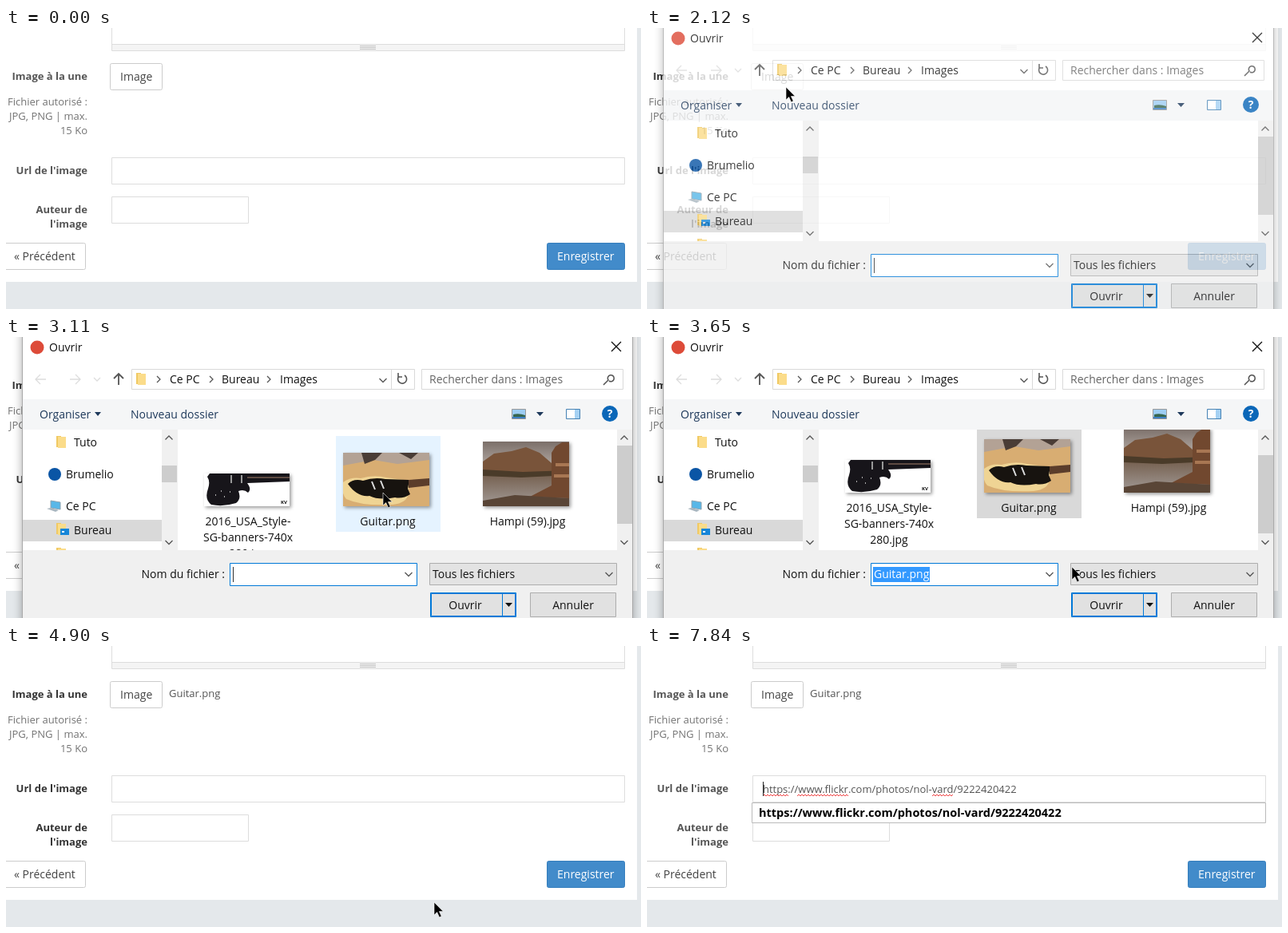
Write an HTML page that moves like this. It is 795 px wide and 352 px high and loops after 8 s.

```html
<!DOCTYPE html>
<html lang="fr">
<head>
<meta charset="utf-8">
<style>
html, body { margin: 0; width: 100%; height: 100%; overflow: hidden; }
svg { display: block; width: 795px; height: 352px; font: 14px "Open Sans", sans-serif; }
.label { font: bold 13px "Open Sans", sans-serif; text-anchor: end; }
.help { font-size: 13px; fill: #737373; text-anchor: end; }
.small { font-size: 13px; fill: #555; }
.field { fill: #fff; stroke: #ddd; }
.btn { fill: #fff; stroke: #ccc; }
.btn.hover { fill: #ebebeb; stroke: #adadad; }
.dark { fill: #444; }
.line { fill: none; stroke: #555; stroke-width: 1.3; }
.box { fill: #fff; stroke: #d9d9d9; }
.mid { text-anchor: middle; }
.navy { fill: #1e395b; }
#dialog { fill: #111; }
#frame { filter: drop-shadow(0 2px 6px #0005); }
.thumb { filter: drop-shadow(2px 2px 2px #0006); }
</style>
</head>
<body>
<svg viewBox="0 0 795 352">
  <defs>
    <path id="right" class="line" d="M-2-4l4 4-4 4"/>
    <path id="down" class="line" d="M-4.500-2l4.500 4.500 4.500-4.500"/>
    <path id="up" class="line" d="M-4.500 2.500l4.500-4.500 4.500 4.500"/>
    <g id="folder"><path d="M0 0h6v14H0z" fill="#f0c963"/><path d="M2 1h10v14H2z" fill="#fbdc8a"/></g>
    <clipPath id="navClip"><path d="M20 116h175v151H20z"/></clipPath>
    <clipPath id="listClip"><path d="M216 116h549v151H216z"/></clipPath>
    <clipPath id="bodyClip"><path d="M422 145h108v67H422z"/></clipPath>
    <linearGradient id="sky" x2="0" y2="1">
      <stop stop-color="#7b6f69"/><stop offset=".4" stop-color="#b5aca6"/>
    </linearGradient>
    <linearGradient id="water" x2="0" y2="1">
      <stop stop-color="#75604f"/><stop offset="1" stop-color="#a39c98"/>
    </linearGradient>
  </defs>

  <!-- form page -->
  <path d="M0 0h795v352H0z" fill="#e4e8eb"/>
  <path d="M0 0h790v318H0z" fill="#fff"/>
  <path class="field" d="M132.500-2v30.500h642V-2"/>
  <path d="M133 21h641v7H133z" fill="#f4f4f4"/>
  <path d="M133 20.500h641" stroke="#ddd"/>
  <path d="M443 22.500h20m-20 2h20m-20 2h20" stroke="#c4c4c4"/>
  <g id="labels">
    <text class="label" x="102" y="65">Image à la une</text>
    <text class="label" x="102" y="183">Url de l'image</text>
    <text class="label" x="102" y="232">Auteur de</text>
    <text class="label" x="102" y="250">l'image</text>
  </g>
  <text class="help" x="102" y="97">Fichier autorisé :</text>
  <text class="help" x="102" y="115">JPG, PNG | max.</text>
  <text class="help" x="102" y="133">15 Ko</text>
  <rect id="imageBtn" class="btn" x="130.500" y="44.500" width="65" height="33" rx="2"/>
  <text class="dark" x="143" y="66">Image</text>
  <text id="chosen" class="small" x="204" y="64">Guitar.png</text>
  <path class="field" d="M132.500 162.500h642v33h-642z"/>
  <path class="field" d="M132.500 211.500h171v33h-171z"/>
  <rect class="btn" x="-5.500" y="269.500" width="105" height="33" rx="2"/>
  <text class="dark" x="10" y="291">« Précédent</text>
  <rect x="677.500" y="269.500" width="97" height="33" rx="2" fill="#428bca" stroke="#357ebd"/>
  <text x="690" y="291" fill="#fff">Enregistrer</text>
  <text id="url" class="small" x="145" y="184">https://www.flickr.com/photos/nol-vard/9222420422</text>
  <path id="squiggles" fill="none" stroke="#e33" stroke-width=".9"/>
  <path id="caret" d="M145.500 170v18" stroke="#222"/>
  <g id="suggest">
    <path d="M131.500 196.500h643v25h-643z" fill="#fff" stroke="#bbb"/>
    <text x="140" y="214" font-size="14.500" font-weight="bold">https://www.flickr.com/photos/nol-vard/9222420422</text>
  </g>

  <!-- file dialog -->
  <g id="dialog">
    <path id="frame" d="M20-20h765v400H20z" fill="#fff"/>
    <circle id="appIcon" cx="39" cy="13" r="8.500" fill="#dd4b39"/>
    <text id="title" y="18">Ouvrir</text>
    <path class="line" d="M758 6l12 12m0-12l-12 12" style="stroke:#111"/>
    <path class="line" d="M50 53H37m6-6l-6 6 6 6M80 53h13m-6-6l6 6-6 6m23-8l4 4 4-4" style="stroke:#ddd"/>
    <path class="line" d="M141 60V46m-6 6l6-6 6 6" style="stroke-width:1.800"/>
    <path class="box" d="M157.500 40.500h354v25h-354zM482.500 40.500v25"/>
    <use href="#folder" x="163" y="45"/>
    <use href="#right" x="191" y="53"/><text x="205" y="58">Ce PC</text>
    <use href="#right" x="257" y="53"/><text x="270" y="58">Bureau</text>
    <use href="#right" x="329" y="53"/><text x="343" y="58">Images</text>
    <use href="#down" x="472" y="54"/>
    <path class="line" d="M492 49a5.500 5.500 0 1 0 7-1m-8-3v5h5" style="stroke-width:1.600"/>
    <path class="box" d="M520.500 40.500h252v25h-252z"/>
    <text x="530" y="58" fill="#666">Rechercher dans : Images</text>
    <path class="line" d="M748 60l6-6a4 4 0 1 1 1 1" style="stroke-width:1.600"/>

    <path d="M21 78h763v38H21z" fill="#f5f6f7"/>
    <text class="navy" x="42" y="102">Organiser</text>
    <path class="navy" d="M111 94h8l-4 5zM664 94h9l-4.500 5z"/>
    <text class="navy" x="156" y="102">Nouveau dossier</text>
    <path d="M633.500 90.500h17v12h-17z" fill="#9dcdf3" stroke="#999"/>
    <path d="M635 97q7-2 15 1v4h-15z" fill="#37664e"/>
    <path d="M634 100h16v2h-16z" fill="#3d80c4"/>
    <path d="M701.500 90.500h17v12h-17z" fill="#fff" stroke="#4582b4"/>
    <path d="M712 91h6v11h-6z" fill="#a5d1f3"/>
    <circle cx="756" cy="96" r="10" fill="#0b67b8"/>
    <text class="mid" x="756" y="101" font-weight="bold" style="fill:#fff">?</text>

    <g clip-path="url(#navClip)">
      <path d="M21 229h174v27H21z" fill="#d9d9d9"/>
      <use href="#folder" x="63" y="124"/><text x="85" y="137">Tuto</text>
      <circle cx="61" cy="172" r="8" fill="#0a55a5"/><text x="75" y="177">Brumelio</text>
      <path d="M56 205l12 2v9l-12-2z" fill="#58b7e8" stroke="#8fa3b0"/><path d="M51 215l5-1 10 3-4 2z" fill="#aab7c0"/>
      <text x="75" y="217">Ce PC</text>
      <use href="#folder" x="63" y="233"/><path d="M68 240h11v8H68z" fill="#1686d9"/><path d="M70 243h3v2h-3z" fill="#fff"/>
      <text x="85" y="247">Bureau</text>
      <use href="#folder" x="63" y="264"/><text x="85" y="277">Eaux</text>
    </g>
    <path d="M195 116h20v151h-20zM765 116h19v151h-19z" fill="#f0f0f0"/>
    <path d="M195 161h19v21h-19z" fill="#cdcdcd"/>
    <path id="thumbBar" d="M765 136h19v98h-19z" fill="#cdcdcd"/>
    <use href="#up" x="204" y="126"/><use href="#down" x="204" y="257"/>
    <use href="#up" x="774" y="126"/><use href="#down" x="774" y="257"/>

    <g clip-path="url(#listClip)"><g id="files">
      <path id="highlight" d="M413 124h131v120H413z"/>
      <g class="thumb">
        <path d="M248 171h107v41H248z" fill="#fff"/>
        <path d="M255 171h100v10l-53 2q6 8 1 12-5-5-12-2 4 10-3 15-16 5-31 2-9-7-4-20 3-9-1-15z" fill="#17151a"/>
        <path d="M302 176h53" stroke="#5d4a42" stroke-width="2"/>
        <path d="M282 173v10m13-10v10" stroke="#999" stroke-width="2"/>
        <path d="M262 198h1m6-5h1m3 7h1m6-6h1" stroke="#aaa" stroke-width="2"/>
        <text x="344" y="209" font-size="6" font-weight="bold">KV</text>
      </g>
      <g class="thumb"><g clip-path="url(#bodyClip)">
        <path d="M422 145h108v67H422z" fill="#d8ad72"/>
        <path d="M422 145h108v9l-40 5-30-5-38 7z" fill="#b3a295"/>
        <path d="M445 145h26l-9 9-13 5zM492 145h24l-9 8z" fill="#4a3d36"/>
        <path d="M422 182q10-7 22-5 17-5 32-1l28 4v16q-2 12-20 14-38 2-58-7-7-8-4-21z" fill="#efd494"/>
        <path d="M428 184q7-7 19-4 14-5 28-2l30 1-2 11 3 7q-9 6-19 4-20 4-32-2-15 2-27-15z" fill="#17130f"/>
        <path d="M504 179l26-2v9l-26 3z" fill="#5b3d2b"/>
        <path d="M458 181l4 10m7-11l4 10" stroke="#ddd" stroke-width="2"/>
      </g></g>
      <g class="thumb">
        <path d="M597 131h108v81H597z" fill="url(#sky)"/>
        <path d="M597 172h108v40H597z" fill="url(#water)"/>
        <path d="M597 156l14-10 22-3 18-5 17 7 15 13 22 3v12H597z" fill="#79543a"/>
        <path d="M597 166l50 3 58-2v6l-60 3-48-2z" fill="#4a3b29"/>
        <path d="M683 145l5-8 8-5h9v70l-49-2 27-14z" fill="#71482f"/>
        <path d="M597 205l40-7 68 4v10H597z" fill="#594536"/>
        <path d="M688 158h17v4h-17zM686 172h19v4h-19z" fill="#a87753"/>
      </g>
      <g class="mid">
        <text x="303" y="236">2016_USA_Style-</text>
        <text x="303" y="256">SG-banners-740x</text>
        <text x="303" y="276">280.jpg</text>
        <text x="478" y="236">Guitar.png</text>
        <text x="653" y="236">Hampi (59).jpg</text>
      </g>
    </g></g>

    <path d="M21 267h763v85H21z" fill="#f0f0f0"/>
    <path id="edge" d="M20.500 0v352M784.500 0v352"/>
    <text x="274" y="302" text-anchor="end">Nom du fichier :</text>
    <path id="nameBox" d="M280.500 283.500h234v28h-234z" fill="#fff"/>
    <path id="nameCaret" d="M284.500 288v19" stroke="#333"/>
    <g id="nameText">
      <path d="M283 288h71v19h-71z" fill="#3399ff"/>
      <text x="284" y="302" style="fill:#fff">Guitar.png</text>
    </g>
    <use href="#down" x="504" y="297"/>
    <path d="M530.500 283.500h234v27h-234z" fill="#e3e3e3" stroke="#adadad"/>
    <text x="534" y="302">Tous les fichiers</text>
    <use href="#down" x="755" y="297"/>
    <path id="openBtn" d="M531.500 320.500h107v30h-107z" stroke="#0078d7"/>
    <path id="openFocus" d="M532.500 321.500h105v28h-105z" fill="none" stroke="#0078d7"/>
    <path d="M621.500 321v29" stroke="#0078d7"/>
    <path d="M625 333h9l-4.500 5z"/>
    <text class="mid" x="575" y="341">Ouvrir</text>
    <path d="M656.500 320.500h107v30h-107z" fill="#e1e1e1" stroke="#adadad"/>
    <text class="mid" x="710" y="341">Annuler</text>
  </g>

  <g id="cursor">
    <path id="arrow" d="M0 0v16l3.700-3.500 2.800 6.300 2.700-1.200-2.800-6h5z" stroke="#fff" stroke-width=".6"/>
    <path id="beam" d="M-3.500-7.500h2.500l1 1 1-1h2.500M0-7v14M-3.500 7.500h2.500l1-1 1 1h2.500" fill="none" stroke="#111" stroke-width="1.200"/>
  </g>
</svg>
<script>
const LOOP = 8000;
const $ = id => document.getElementById(id);
const show = (id, on) => $(id).style.display = on ? '' : 'none';
const clamp = v => Math.min(1, Math.max(0, v));

// time, x, y of the pointer
const route = [
  [1020, 526, 324], [1100, 457, 289], [1170, 402, 259], [1330, 295, 183],
  [1490, 190, 84], [1560, 190, 84], [1570, 176, 76], [1640, 169, 73], [1880, 169, 73],
  [1890, 174, 74], [2500, 174, 74], [2800, 335, 150], [3110, 472, 195], [3330, 472, 195],
  [3600, 525, 275], [3880, 566, 344], [4200, 566, 344], [4280, 565, 342], [4700, 565, 342],
  [4980, 525, 313], [5140, 460, 275], [5290, 418, 235], [5440, 405, 206],
  [5590, 405, 205], [5670, 407, 198], [5810, 407, 198], [5820, 406, 197], [LOOP, 406, 197]
];

function pointer(t) {
  const i = Math.max(1, route.findIndex(p => p[0] > t));
  const [t0, x0, y0] = route[i - 1], [t1, x1, y1] = route[i];
  const k = clamp((t - t0) / (t1 - t0));
  return [Math.round(x0 + (x1 - x0) * k), Math.round(y0 + (y1 - y0) * k)];
}

function zigzag(x0, x1) {
  let d = `M${x0} 188`;
  for (let x = x0 + 2, up = true; x <= x1; x += 2, up = !up) d += `L${x} ${up ? 186 : 188}`;
  return d;
}
$('squiggles').setAttribute('d', zigzag(145, 177) + zigzag(188, 252) + zigzag(357, 384));

function draw(t) {
  const [x, y] = pointer(t);
  const open = t >= 2040 && t < 4670;
  const selected = t >= 3190, scrolled = t >= 3270, closing = t >= 4510;

  const shade = 85 - 34 * clamp((t - 1020) / 400) + 34 * clamp((t - 7380) / 460);
  $('labels').style.fill = `rgb(${shade},${shade},${shade})`;
  $('imageBtn').classList.toggle('hover', t >= 1570 && t < 2040);
  show('chosen', t >= 4670);
  show('caret', t >= 5990);
  show('url', t >= 6840);
  show('suggest', t >= 6920);
  show('squiggles', t >= 7380);

  show('dialog', open);
  $('dialog').style.opacity = clamp(0.4 + (t - 2040) / 200);
  show('files', t >= 2190);
  show('appIcon', !closing);
  $('title').setAttribute('x', closing ? 29 : 54);
  $('title').style.fill = closing ? '#555' : '#111';
  $('edge').style.stroke = closing ? '#dcab8a' : '#aaa';
  $('nameBox').style.stroke = closing ? '#7a7a7a' : '#0078d7';
  $('files').setAttribute('transform', `translate(0 ${scrolled ? -17 : 0})`);
  $('thumbBar').setAttribute('transform', `translate(0 ${scrolled ? 12 : 0})`);
  const overFile = x > 413 && x < 544 && y > 124 && y < 244;
  $('highlight').style.fill = selected ? '#d9d9d9' : overFile ? '#e5f3ff' : 'none';
  show('nameCaret', !selected);
  show('nameText', t >= 3340);
  const overOpen = x > 531 && x < 638 && y > 320;
  $('openBtn').style.fill = overOpen ? '#cce4f7' : '#e1e1e1';
  show('openFocus', !overOpen);

  const typing = !open && x > 132 && x < 775 && y > 162 && y < 199;
  show('cursor', t >= 1020 && t < 6840);
  show('arrow', !typing);
  show('beam', typing);
  $('cursor').setAttribute('transform', `translate(${x} ${y})`);
}

const start = performance.now();
function tick() {
  draw((performance.now() - start) % LOOP);
  requestAnimationFrame(tick);
}
tick();
</script>
</body>
</html>
```
